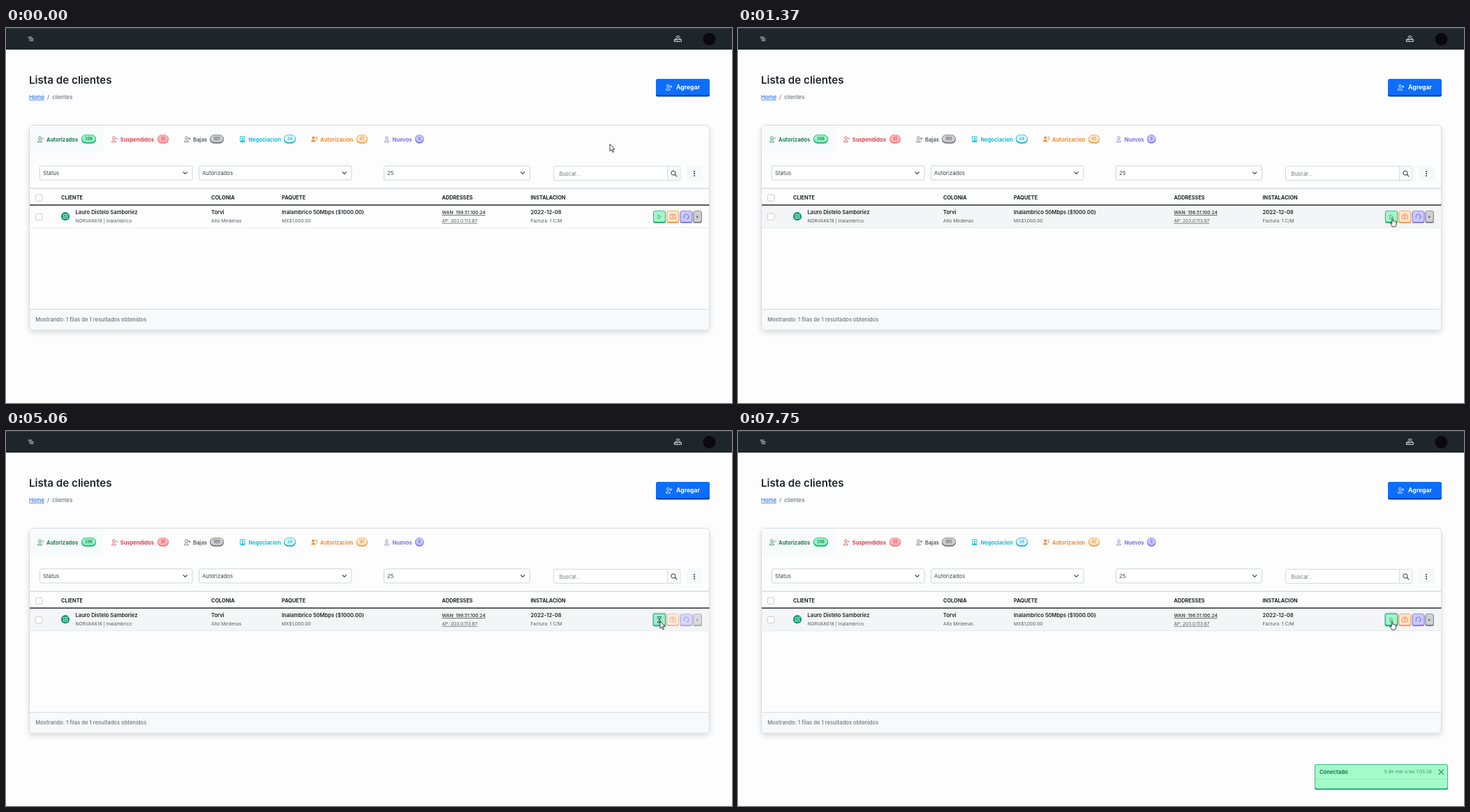
Animation of 1040x538 px, one loop 8000 ms. Source, as an HTML page:

```html
<!DOCTYPE html>
<html lang="es">
<head>
<meta charset="utf-8">
<title>Lista de clientes</title>
<style>
html, body { margin: 0; width: 100%; height: 100%; overflow: hidden; background: #fdfdfe; }
svg { display: block; width: 100%; height: 100%; }
text { font-family: Inter, "Open Sans", sans-serif; }
</style>
</head>
<body>
<svg id="stage" viewBox="0 0 1040 538" xmlns="http://www.w3.org/2000/svg"></svg>
<script>
const LOOP = 8000;
const INK = '#212529', GREY = '#6c757d';

const text = (x, y, str, size, weight, fill, extra = '') =>
  `<text x="${x}" y="${y}" font-size="${size}" font-weight="${weight}" fill="${fill}" ${extra}>${str}</text>`;
const rect = (x, y, w, h, r, fill, stroke = 'none', extra = '') =>
  `<rect x="${x}" y="${y}" width="${w}" height="${h}" rx="${r}" fill="${fill}" stroke="${stroke}" ${extra}/>`;
const line = (d, color, width = 1, extra = '') =>
  `<path d="${d}" fill="none" stroke="${color}" stroke-width="${width}" stroke-linecap="round" stroke-linejoin="round" ${extra}/>`;
const group = (x, y, content, extra = '') => `<g transform="translate(${x} ${y})" ${extra}>${content}</g>`;

// A face resting on a darker, thicker lower edge.
const raised = (x, y, w, h, r, fill, edge) =>
  rect(x, y + 1.2, w, h - 1.2, r, edge) + rect(x + .4, y + .4, w - .8, h - 2, r, fill, edge, 'stroke-width=".8"');

const person = (x, y, color, mark = '') => group(x, y,
  `<circle cx="3.4" cy="2.6" r="1.8" fill="none" stroke="${color}" stroke-width=".8"/>` +
  line('M.5 8.2C.5 4.8 6.3 4.8 6.3 8.2Z', color, .8) + line(mark, color, .8));
const MARK = { check: 'M5.8 3.6l1.1 1.1 2-2.2', minus: 'M6.4 3.6h2.4', plus: 'M6.2 3.6h2.8M7.6 2.2v2.8' };

function tabIcon(kind, x, color) {
  if (kind === 'badge') return group(x, 155,
    line('M1 .6h6v8h-6z', color, .9) + `<circle cx="4" cy="3.5" r="1.3" fill="${color}"/><path d="M1.5 8C1.5 5 6.5 5 6.5 8Z" fill="${color}"/>`);
  if (kind === 'solid') return group(x, 155,
    `<circle cx="3.2" cy="2.6" r="2" fill="${color}"/><path d="M0 8.3C0 4.2 6.4 4.2 6.4 8.3Z" fill="${color}"/>` +
    line('M6.4 1.4h2.6M6.8 3.4h2.2M7.2 5.4h1.8', color, .9));
  return person(x, 155, color, MARK[kind]);
}

const TABS = [
  // icon, icon x, label x, label, color, badge x, badge width, count, badge fill, badge edge
  ['check', 45, 58, 'Autorizados', '#1d8152', 108, 21, 398, '#98f3c2', '#18ad77'],
  ['minus', 151, 163.7, 'Suspendidos', '#cb4851', 217, 16, 31, '#ffb5b7', '#ef7b80'],
  ['plus', 255, 268, 'Bajas', '#62676c', 292, 20, 105, '#cdcdd0', '#75787c'],
  ['badge', 335, 347.5, 'Negociacion', '#1fb9d3', 398, 17, 34, '#e0f7fa', '#20b0c8'],
  ['solid', 437, 450, 'Autorizacion', '#e98f3d', 502, 16, 61, '#fde6cb', '#efa046'],
  ['', 542, 553.5, 'Nuevos', '#7976e4', 586, 12.5, 8, '#c9c6fb', '#7f7ae3'],
];

const tab = ([icon, iconX, x, label, color, bx, bw, count, fill, edge]) =>
  tabIcon(icon, iconX, color) + text(x, 162.5, label, 7.55, 700, color) +
  raised(bx, 153, bw, 12.8, 6, fill, edge) +
  text(bx + bw / 2, 160.8, count, 5.7, 600, color, 'text-anchor="middle"');

const select = (x, w, label) =>
  rect(x + .5, 197.8, w - 1, 20.2, 2, '#fff', '#ced4da') + text(x + 5, 210.9, label, 7.75, 400, '#3b4046') +
  line(`M${x + w - 13.5} 206.6l2.7 2.7 2.7-2.7`, '#343a40', 1.1);

const checkbox = y => rect(42.4, y, 9.6, 9.4, 2, '#fff', '#c3c7cc', 'stroke-width=".9"');

const COLUMNS = [
  [79, 'CLIENTE'], [294, 'COLONIA'], [395, 'PAQUETE'], [624.5, 'ADDRESSES'], [751.5, 'INSTALACION'],
];
const CELLS = [
  [99.5, 'Lauro Distelo Samboríez', 'NORVAK618 | Inalambrico'],
  [294, 'Torvi', 'Alto Mirdenas'],
  [395, 'Inalambrico 50Mbps ($1000.00)', 'MX$1,000.00'],
  [751.5, '2022-12-08', 'Factura: 1 C/M'],
];
const cell = ([x, top, sub]) =>
  text(x, 267.4, top, 7.58, 600, INK) + text(x, 278.9, sub, 6.63, 400, '#555b61');

const topBar = rect(0, 0, 1040, 31, 0, '#1f262b') + rect(0, 0, 1040, 1, 0, '#353c41') +
  line('M32 13.2h5M33.2 15.6h6M34 18h5', '#e4e6e8', 1) +
  group(957, 10, line('M.8 6.3h9.6v3H.8zM3 6.2V4.6M8.2 6.2V4.6M3 2.2q2.6-2 5.2 0M4.2 4q1.4-1 2.8 0', '#e4e6e8', 1) +
    line('M2.4 7.8h.1M4.4 7.8h.1', '#e4e6e8', .9)) +
  '<circle cx="1007.5" cy="16" r="9" fill="#0b0812"/>';

const heading = text(33, 80, 'Lista de clientes', 15.17, 600, INK) +
  text(33, 101.8, 'Home', 7.8, 500, '#2b6fdd', 'text-decoration="underline"') +
  text(59, 101.8, '/', 7.8, 500, GREY) + text(66.3, 101.8, 'clientes', 7.8, 500, GREY) +
  rect(931, 74, 77, 24.4, 2.5, '#0a46a8') + rect(931, 73, 77, 23, 2.5, '#0d6efd') +
  person(945, 80.5, '#fff', MARK.plus) + text(960, 88, 'Agregar', 8.6, 700, '#fff');

const card = rect(33.5, 139.5, 974, 293.5, 5, '#fdfdfe', '#d9dce0', 'filter="url(#shadow)"') +
  rect(34, 140, 105.5, 39.5, 4, '#f8fbfb') + TABS.map(tab).join('') +
  select(48, 219.5, 'Status') + select(276, 219.5, 'Autorizados') + select(541, 210, '25') +
  rect(784.5, 198.3, 181.5, 20.2, 2, '#fff', '#d3d8dd') + rect(948, 198.8, 17.5, 19.2, 0, '#f8f9fa') +
  line('M947.7 198.5v19.8', '#d3d8dd') + text(792.5, 211.6, 'Buscar...', 7.5, 400, '#70767c') +
  '<circle cx="956" cy="208" r="3.1" fill="none" stroke="#343a40"/>' + line('M958.4 210.4l2.4 2.4', '#343a40', 1.2) +
  rect(975, 198, 23, 21, 2, '#f7f8f9') +
  [205.7, 208.8, 211.9].map(y => `<circle cx="986" cy="${y}" r=".95" fill="${INK}"/>`).join('') +
  rect(34, 229.3, 973.5, 1.7, 0, '#dcdee2') + checkbox(239) +
  COLUMNS.map(([x, label]) => text(x, 246.2, label, 7.33, 700, INK)).join('') +
  rect(34, 255, 973.5, 31.5, 0, '#f4f5f6', 'none', 'id="rowHover"') +
  rect(34, 253.2, 973.5, 1.6, 0, '#35393e') + rect(34, 286.2, 973.5, .9, 0, '#e6e8f0') + checkbox(266.2) +
  '<circle cx="85" cy="270.2" r="6.1" fill="#0f986d"/>' +
  line('M85.4 267.4h-3.1v5.6h5.6v-3M84.4 271l.3-1.4 3.1-3.1 1 1-3.1 3.1z', '#fff', .75) +
  CELLS.map(cell).join('') +
  text(624.5, 267.4, 'WAN: 198.51.100.24', 6.63, 500, INK, 'text-decoration="underline"') +
  text(624.5, 278.9, 'AP: 203.0.113.87', 6.63, 400, '#50565c', 'text-decoration="underline"') +
  '<path d="M34 404h973v24q0 4.5-4.5 4.5h-964q-4.5 0-4.5-4.5z" fill="#f8f9fa"/>' +
  rect(34, 403.2, 973.5, .9, 0, '#d5d8dc') +
  text(42.3, 421.3, 'Mostrando: 1 filas de 1 resultados obtenidos', 7.62, 500, GREY);

const actions =
  rect(926, 260.8, 20, 20, 3.5, '#93cfd8', 'none', 'id="ring"') +
  '<g id="playButton">' + raised(927, 262, 18, 18, 2.5, '#a3f6c7', '#18ad77') + '</g>' +
  line('M934.2 268.2l4.2 2.5-4.2 2.5z', '#3fa37a', .8, 'id="play"') +
  group(936, 270.8, line('M-2.9-4.2h5.8M-2.9 4.2h5.8M-2.1-4.1v1.5L2.1 2.6v1.5M2.1-4.1v1.5L-2.1 2.6v1.5', '#27684f', .95) +
    '<path d="M-1.6-2.2h3.2L0-.2zM-1.6 3.9L0 1.8l1.6 2.1z" fill="#27684f"/>', 'id="hourglass"') +
  '<g id="otherButtons">' +
  raised(946.5, 262, 17.6, 18, 2.5, '#fde6cf', '#f0994a') +
  line('M951.3 268.6h7.8v5.2h-7.8zM952.6 266.9h5.2', '#f0814a', .8) +
  '<circle cx="955.2" cy="271.2" r="1.2" fill="none" stroke="#f0814a" stroke-width=".7"/>' +
  raised(965.7, 262, 17.6, 18, 2.5, '#cbc8fc', '#7f7ae3') +
  line('M971.2 271.5v-1.2a3.3 3.3 0 0 1 6.6 0v1.4q0 2.2-2.4 2.4M971.4 270.6v1.8M977.6 270.6v1.8', '#726dd8', .9) +
  raised(984.5, 262, 12.2, 18, 2.5, '#cfcfd1', '#7a7d80') +
  '<path d="M989.5 268.8l2.2 2.1-2.2 2.1z" fill="#4b4f53"/></g>';

const tooltip = '<g id="tooltip">' + rect(944.3, 282.4, 52.4, 13.2, 0, '#1b1b1c', '#4a4a4b', 'stroke-width=".6"') +
  text(948.6, 291.3, 'Ejecute un ping', 6.25, 400, '#f2f2f2', 'style="font-family:\'Open Sans\',\'Noto Sans\',sans-serif"') + '</g>';

const toast = '<g id="toast">' + rect(826, 479, 191, 35.8, 2.5, '#25a872') +
  rect(826.5, 478.5, 190, 34.6, 2.5, '#a3fbc9', '#35b981') + rect(827, 499, 189, .7, 0, '#8ceab6') +
  text(833, 491.9, 'Conectado', 7.58, 700, '#1d7c50') +
  text(925.7, 491.2, '5 de mar a las 1:05:26', 6.63, 400, '#4c9472') +
  line('M1004 486l6.4 6.4M1010.4 486l-6.4 6.4', '#3d7d5f', 1.1) + '</g>';

const cursor = '<g id="cursor" stroke="#111" stroke-width=".8" stroke-linejoin="round" fill="#fff">' +
  '<path id="arrow" d="M0 0V10.2L2.3 8.1 3.9 11.8 5.5 11.1 3.9 7.5H7Z"/>' +
  '<path id="hand" d="M-.8.6Q0-.7.8.6V4.4Q1.8 3.8 2.3 4.7 3.4 4.1 3.8 5.1 5.2 4.9 5.4 6.1V8.6Q5.4 10.4 4.3 12.2H-.5Q-1.3 10-3 8.1-3.1 6.7-1.9 7.1L-.8 8Z"/></g>';

const stage = document.getElementById('stage');
stage.innerHTML = '<defs><filter id="shadow" x="-5%" y="-5%" width="110%" height="115%">' +
  '<feDropShadow dx="0" dy="3.5" stdDeviation="3.5" flood-color="#000" flood-opacity=".14"/></filter></defs>' +
  topBar + heading + card + actions + tooltip + toast + cursor;

const el = Object.fromEntries([...stage.querySelectorAll('[id]')].map(node => [node.id, node]));
const clamp = v => Math.max(0, Math.min(1, v));
const ramp = (t, start, length) => clamp((t - start) / length);
const smooth = v => v * v * (3 - 2 * v);
const show = (node, visible) => node.setAttribute('opacity', +visible);

// Jumps of the pointer while it enters the row: time, x, y.
const JUMPS = [[0, 865, 166.5], [190, 868, 172], [240, 893, 217], [280, 919, 261], [330, 923, 261], [380, 924, 261]];

function pointer(t) {
  if (t >= 2690) return [937, 273];
  if (t >= 2650) return [938, 273.5];
  const [, x, y] = JUMPS.filter(([at]) => t >= at).pop();
  const k = smooth(ramp(t, 1000, 460));
  return [x + (939 - x) * k, y + (274 - y) * k];
}

function draw(t) {
  const [x, y] = pointer(t);
  const loading = t >= 3260 && t < 7560;
  const dim = 1 - .35 * (ramp(t, 3240, 150) - ramp(t, 7540, 150));
  const overButton = x > 927 && y > 262 && !(t >= 3260 && t < 7370);

  el.cursor.setAttribute('transform', `translate(${x} ${y})`);
  show(el.arrow, !overButton);
  show(el.hand, overButton);
  show(el.rowHover, y > 254);
  show(el.tooltip, t >= 2030 && t < 3260);

  show(el.ring, ramp(t, 3240, 150));
  show(el.playButton, 1 - (1 - dim) * .6);
  show(el.otherButtons, dim);
  show(el.play, !loading);

  // The hourglass fades to 40 % and back every two seconds.
  const phase = ((t - 3300 + 2000) % 2000) / 1000;
  const faded = smooth(phase < 1 ? phase : 2 - phase);
  show(el.hourglass, loading ? 1 - .6 * faded : 0);

  show(el.toast, ramp(t, 7530, 200));
}

function tick() {
  draw(performance.now() % LOOP);
  requestAnimationFrame(tick);
}
tick();
</script>
</body>
</html>
```
